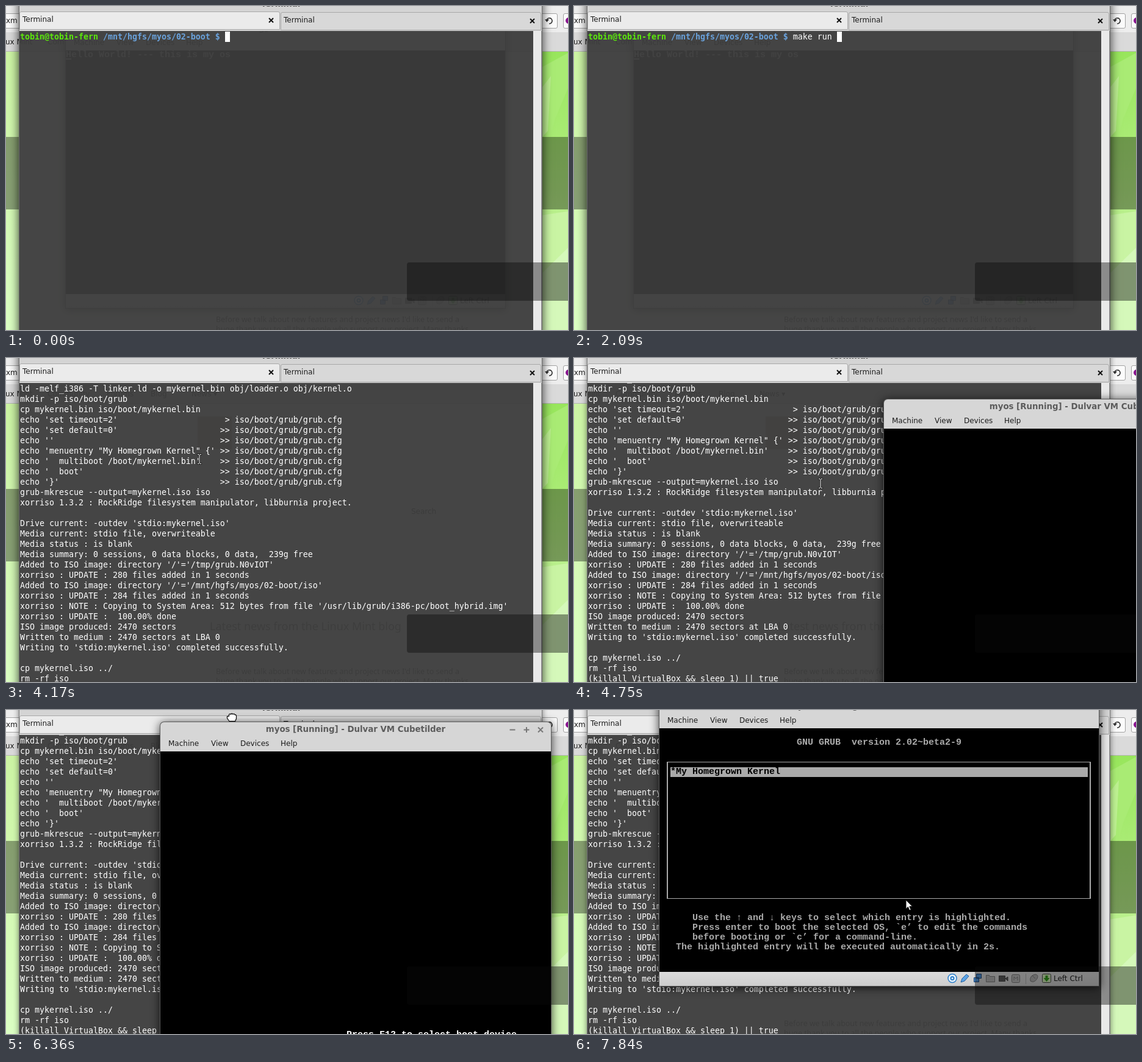
An HTML page for the animation above (8 s loop, 921 by 532 pixels).

```html
<!DOCTYPE html>
<html lang="en">
<head>
<meta charset="utf-8">
<title>Kernel boot</title>
<style>
html, body { margin: 0; width: 100%; height: 100%; overflow: hidden; }
#stage { position: relative; width: 921px; height: 532px; overflow: hidden; background: #d3f6b4;
  font: 12px/24px "DejaVu Sans", sans-serif; color: #1c1c1c; white-space: nowrap; }
#stage div, #stage svg { position: absolute; }
#lines, .vga, .news { white-space: pre; }

/* browser behind everything */
#page { inset: 0; }
#scene { left: 0; top: 75px; }
.toolbar { left: 0; right: 0; top: 0; height: 43px; background: #ededed; }
.marks { left: 0; right: 0; top: 43px; height: 31px; background: #dadada; border-bottom: 1px solid #b4b4b4; }
.field { box-sizing: border-box; top: 12px; height: 25px; background: #fbfbfb; border: 1px solid #a2a2a2; border-radius: 3px; }
.band { left: 0; right: 0; top: 215px; height: 119px; background: rgba(0,0,0,.36); }
.sheet { left: 22px; top: 75px; width: 857px; height: 460px; background: #f4f6f0; }
.news { font: 12.4px/16px "Noto Sans", sans-serif; left: 344px; top: 507px; color: #333; }

/* virtual machine window */
.vm { left: 0; top: 0; border-radius: 6px 6px 0 0; background: #d6d6d6; box-shadow: 0 0 0 1px #5a5a5a, 0 2px 15px 1px rgba(0,0,0,.75); }
.vm .name { left: 0; right: 0; top: 0; height: 24px; text-align: center; font: bold 13.33px/24px "DejaVu Sans", sans-serif; color: #5c5c5c; }
.vm .tools { right: 10px; top: 6px; }
.vm .menu { left: 0; top: 23px; }
#stage .screen { position: relative; margin-top: 48px; width: 720px; height: 400px; background: #000; overflow: hidden; }
#stage .status { position: relative; height: 23px; background: linear-gradient(#dcdcdc, #cdcdcd); }
.vga { left: 0; top: 0; font: bold 15px/16px "Liberation Mono", "DejaVu Sans Mono", monospace; color: #aaa; }
#ghost { transform: translate(98px, 25px); animation: ghost 8s step-end infinite; }
#guest { animation: guest 8s step-end infinite, late 8s step-end infinite; }
#guest .screen { animation: mode 8s step-end infinite; }
#splash { left: 305px; top: 458px; color: #fff; animation: splash 8s step-end infinite; }
#grub { inset: 0; animation: grub 8s step-end infinite; }
#grub .frame { left: 12px; top: 55px; width: 691px; height: 223px; border: solid #aaa; border-width: 1px 2px; }
#grub .pick { left: 18px; top: 64px; width: 684px; height: 16px; background: #aaa; }
#grub .pick .vga { color: #000; }
#count { top: 352px; left: 27px; animation: count 8s step-end infinite; }

/* terminal window */
#term { left: 22px; top: -15px; width: 856px; height: 570px; animation: focus 8s step-end infinite; }
#term .bar { left: 0; top: 0; width: 856px; height: 56px; background: #d4d4d4; }
#term .name { left: 0; right: 0; top: 0; text-align: center; font: bold 13.33px/24px "DejaVu Sans", sans-serif; color: #4c4c4c; }
.tab { box-sizing: border-box; height: 30px; border: 1px solid #a8a8a8; border-radius: 3px 3px 0 0; line-height: 25px; padding-left: 4px; }
.tab svg { right: 9px; top: 9px; }
#term .scroll { left: 842px; top: 56px; width: 13px; height: 520px; background: #e9e9e9; border-right: 1px solid #999; }
#text { left: 0; top: 56px; width: 842px; height: 520px; overflow: hidden; background: rgba(61,61,61,.95); }
#lines { left: 1px; top: 1px; font: 13.29px/17px "DejaVu Sans Mono", monospace; color: #fff; animation: scroll 8s step-end infinite; }
.user { color: #5be80c; }
.path { color: #6aa2dc; }
#prompt { left: 0; top: 0; height: 17px; }
#typed { display: inline-block; vertical-align: top; height: 17px; overflow: hidden; animation: typing 8s step-end infinite; }
#caret { display: inline-block; vertical-align: top; width: 8px; height: 17px; background: #fff; animation: caret 8s step-end infinite; }
#out { left: 0; top: 17px; width: 842px; overflow: hidden; animation: output 8s step-end infinite; }

#shade { left: 657px; top: 421px; width: 280px; height: 63px; border-radius: 4px; background: rgba(10,10,10,.42); animation: shade 8s step-end infinite; }
#mouse { left: 0; top: 0; animation: mouse 8s step-end infinite; }
#mouse svg { overflow: visible; left: 0; top: 0; }
#beam { animation: beam 8s step-end infinite; }
#arrow { animation: arrow 8s step-end infinite; }
#hand { animation: hand 8s step-end infinite; }

@keyframes typing {
  0% { width: 0 } 3.75% { width: 8px } 5.625% { width: 16px }
  11.125% { width: 24px } 13% { width: 32px } 14.875% { width: 40px }
  18.625% { width: 48px } 20.5% { width: 56px } 24.25% { width: 64px } 26.125% { width: 72px }
}
@keyframes caret { 0% { visibility: visible } 29.75% { visibility: hidden } }
@keyframes output {
  0% { height: 0 } 29.75% { height: 85px } 31.625% { height: 289px }
  33.5% { height: 459px } 37.25% { height: 476px } 39.125% { height: 612px }
}
@keyframes scroll {
  0% { transform: none } 39.125% { transform: translateY(-34px) } 40.875% { transform: translateY(-68px) }
  42.75% { transform: translateY(-102px) } 54% { transform: translateY(-119px) }
}
@keyframes focus {
  0% { box-shadow: 0 0 0 1px #6a6a6a, 0 2px 15px 1px rgba(0,0,0,.75) }
  55.75% { box-shadow: 0 0 0 1px #7a7a7a, 0 1px 10px rgba(0,0,0,.6) }
}
@keyframes ghost { 0% { visibility: visible } 40.875% { visibility: hidden } }
@keyframes late { 0% { visibility: hidden } 55.75% { visibility: visible } }
@keyframes guest {
  0% { transform: translate(508px, 68px) }
  66.75% { transform: translate(500px, 66px) } 68.625% { transform: translate(478px, 60px) }
  70.375% { transform: translate(440px, 52px) } 72.25% { transform: translate(392px, 44px) }
  74.125% { transform: translate(340px, 36px) } 75.875% { transform: translate(297px, 29px) }
  77.75% { transform: translate(268px, 23px) } 79.5% { transform: translate(253px, 20px) }
  81.25% { transform: translate(222px, 8px) } 83.125% { transform: translate(176px, -8px) }
  84.875% { transform: translate(140px, -18px) }
}
@keyframes mode { 0% { width: 640px; height: 480px } 88.75% { width: 720px; height: 400px } }
@keyframes splash { 0% { opacity: 0 } 77.75% { opacity: 1 } 86.75% { opacity: 0 } }
@keyframes grub { 0% { opacity: 0 } 92.375% { opacity: 1 } }
@keyframes count { 0% { opacity: 0 } 96.125% { opacity: 1 } }
@keyframes shade { 0% { clip-path: none } 31.625% { clip-path: inset(0 0 0 163px) } 39.125% { clip-path: none } }
@keyframes mouse {
  0% { transform: translate(519px, 124px) }
  39.125% { transform: translate(518px, 131px) } 40.875% { transform: translate(516px, 140px) }
  42.75% { transform: translate(515px, 147px) } 46.5% { transform: translate(465px, 157px) }
  48.375% { transform: translate(401px, 166px) } 52.125% { transform: translate(317px, 166px) }
  54% { transform: translate(322px, 172px) } 55.75% { transform: translate(345px, 184px) }
  57.625% { transform: translate(376px, 197px) } 59.375% { transform: translate(404px, 206px) }
  61.25% { transform: translate(478px, 172px) } 63.125% { transform: translate(570px, 112px) }
  65% { transform: translate(625px, 80px) } 66.75% { transform: translate(617px, 76px) }
  68.625% { transform: translate(595px, 68px) } 70.375% { transform: translate(557px, 56px) }
  72.25% { transform: translate(509px, 42px) } 74.125% { transform: translate(457px, 30px) }
  75.875% { transform: translate(414px, 21px) } 77.75% { transform: translate(385px, 15px) }
  79.5% { transform: translate(370px, 12px) } 81.25% { transform: translate(339px, 3px) }
  83.125% { transform: translate(293px, -3px) } 84.875% { transform: translate(257px, -6px) }
  86.75% { transform: translate(268px, 20px) } 88.75% { transform: translate(315px, 78px) }
  90.5% { transform: translate(385px, 148px) } 92.375% { transform: translate(455px, 208px) }
  94.25% { transform: translate(500px, 246px) } 96.125% { transform: translate(530px, 286px) }
  98% { transform: translate(544px, 312px) }
}
@keyframes beam { 0% { opacity: 0 } 37.25% { opacity: 1 } 63.125% { opacity: 0 } }
@keyframes arrow { 0% { opacity: 0 } 63.125% { opacity: 1 } 66.75% { opacity: 0 } 86.75% { opacity: 1 } }
@keyframes hand { 0% { opacity: 0 } 66.75% { opacity: 1 } 84.875% { opacity: 0 } }
</style>
</head>
<body>
<div id="stage">
  <div id="page">
    <svg id="scene" width="921" height="457">
      <defs>
        <linearGradient id="pale" x2="0" y2="1"><stop stop-color="#ccf4a4"/><stop offset="1" stop-color="#dcffc4"/></linearGradient>
        <linearGradient id="leaf" x2="0" y2="1"><stop stop-color="#98e65c"/><stop offset=".5" stop-color="#b4ee83"/><stop offset="1" stop-color="#d6f9bb"/></linearGradient>
      </defs>
      <path fill="url(#pale)" d="M0 0H450V457H0z"/>
      <path fill="url(#leaf)" d="M450 0H921V457H450z"/>
      <path fill="#a9eb74" d="M870 30L921 2V60L900 110L892 140H870z"/>
      <path fill="#bdf091" d="M870 70L893 40L888 130L870 150z"/>
      <path fill="#c9f4a3" d="M870 270L921 262V330L870 380z"/>
      <path fill="#d5f8ba" d="M870 372L921 322V457H870z"/>
    </svg>
    <div class="band"></div>
    <div class="sheet"></div>
    <div class="toolbar">
      <div class="field" style="left:-10px;width:850px"></div>
      <div style="left:0;top:12px">xm</div>
      <div class="field" style="left:860px;width:44px"></div>
      <svg style="left:882px;top:16px" width="17" height="17" fill="none" stroke="#333" stroke-width="1.7"><path d="M4 7A4.6 4.6 0 1 1 8 13"/><path fill="#333" stroke="none" d="M1 6h7l-3.6 4.6z"/></svg>
      <div class="field" style="left:913px;width:60px"></div>
      <div style="left:917px;top:19px;width:10px;height:10px;border-radius:5px;background:#8a1490"></div>
    </div>
    <div class="marks">
      <div style="left:-1px;top:4px">ux Mint</div>
      <div style="left:68px;top:4px">Community</div>
      <div style="left:165px;top:4px">Forums</div>
      <div style="left:237px;top:4px">Blog</div>
      <div style="left:304px;top:4px">News ▾</div>
    </div>
    <div style="left:314px;top:96px;width:56px;height:54px;background:#a9a58c"></div>
    <div style="left:664px;top:240px">Search</div>
    <div style="left:334px;top:428px;font:18px/24px 'Noto Sans',sans-serif;color:#555">Latest news from the Linux Mint blog</div>
    <div class="news">Before we talk about new features and project news I'd like to send a
huge thank you to all the people who support our project. Many thanks</div>
  </div>
  <div id="ghost" class="vm"></div>
  <div id="term">
    <div class="bar">
      <div class="name">Terminal</div>
      <div class="tab" style="left:0;top:24px;width:427px;background:#ebebeb">Terminal</div>
      <div class="tab" style="left:428px;top:25px;width:427px;background:#d8d8d8">Terminal</div>
    </div>
    <div id="text"><div id="lines"><div id="prompt"><b class="user">tobin@tobin-fern</b> <b class="path">/mnt/hgfs/myos/02-boot $</b> <span id="typed">make run </span><span id="caret"></span></div><div id="out"></div></div></div>
    <div class="scroll"></div>
  </div>
  <div id="guest" class="vm"></div>
  <div id="mouse">
    <svg id="beam" width="1" height="1" fill="none"><path stroke="#222" stroke-width="3" d="M-4-7.5H4M-4 7.5H4M0-7V7"/><path stroke="#fff" d="M-3-7.5H-1L0-6.5 1-7.5H3M-3 7.5H-1L0 6.5 1 7.5H3M0-6.5V6.5"/></svg>
    <svg id="arrow" width="1" height="1"><path fill="#fff" stroke="#111" d="M0 0V14.5L3.4 11.3 5.8 17 8.2 16 5.8 10.6H10.4z"/></svg>
    <svg id="hand" width="1" height="1"><path fill="#fff" stroke="#111" stroke-width="1.3" d="M-4 6.5L-7.5 1.5V-1.5L-4.5-2V-4.5Q-3-6.5-1.5-5Q0-7 2-5Q4-6.5 5-4.2Q7.5-4.5 7.5-2V2L5.5 6.5z"/></svg>
  </div>
  <div id="shade"></div>
</div>
<script>
const $ = id => document.getElementById(id);
const at = (x, text) => `<div style="left:${x}px">${text}</div>`;

// Window chrome shared by both virtual machine windows
const chrome = screen => `
<div class="name">myos [Running] - Dulvar VM Cubetilder</div>
<svg class="tools" width="62" height="13" stroke="#777" stroke-width="2"><path d="M4.500 6.500h9M27.500 6.500h9M32 2v9M51 2.500l8 8M59 2.500l-8 8"/></svg>
<div class="menu">${at(13, 'Machine')}${at(83, 'View')}${at(131, 'Devices')}${at(197, 'Help')}</div>
<div class="screen">${screen}</div>
<div class="status">
<svg width="720" height="23" fill="none" stroke="#777">
<circle cx="480" cy="10.500" r="7" fill="#e6f2fc" stroke="#2d7fca" stroke-width="1.500"/><circle cx="480" cy="10.500" r="2.500" stroke="#2d7fca" stroke-width="2"/>
<path fill="#5ca4e6" stroke="#225f9e" d="M494 17l2-6 7-7 4 3-7 8z"/>
<path fill="#4d92d8" stroke="#173f70" d="M519.500 3.500h8v7h-8zM515.500 9.500h8v7h-8z"/>
<path fill="#b4b4b4" d="M535.500 5.500h5l1 2h8v9h-14z"/>
<path fill="#555" stroke="#444" d="M556.500 6.500h10v9h-10zM567 11l4-3v7z"/>
<rect x="577.500" y="4.500" width="13" height="13" rx="2" fill="#bbb"/><path d="M581 14V8l3 3 3-3v6"/>
<path stroke="#aaa" d="M600.500 3v17"/>
<path fill="#b0b0b0" d="M608 15q-2-9 8-11q6 1 3 7q-5 8-11 4zM611 6l5 5"/>
<rect x="627.500" y="3.500" width="14" height="14" rx="2" fill="#cde8b4" stroke="#444"/><path fill="#2f9a17" stroke="none" d="M632.500 6h4v4h3l-5 6-5-6h3z"/>
</svg><div style="left:646px;top:-1px">Left Ctrl</div></div>`;

$('ghost').innerHTML = chrome(`<div class="vga">Hello World! --- this is my os</div>
<div style="left:0;top:13px;width:9px;height:2px;background:#aaa"></div>`);

const help = [
  'Use the ↑ and ↓ keys to select which entry is highlighted.',
  'Press enter to boot the selected OS, `e’ to edit the commands',
  'before booting or `c’ for a command-line.'
].join('\n');

$('guest').innerHTML = chrome(`<div id="splash" class="vga">Press F12 to select boot device.</div>
<div id="grub">
<div class="vga" style="left:225px;top:16px">GNU GRUB  version 2.02~beta2-9</div>
<div class="frame"></div>
<div class="pick"><div class="vga">*My Homegrown Kernel</div></div>
<div class="vga" style="left:54px;top:304px">${help}</div>
<div id="count" class="vga">The highlighted entry will be executed automatically in 2s.</div>
</div>`);

for (const tab of document.querySelectorAll('.tab'))
  tab.innerHTML += '<svg width="9" height="9" stroke="#111" stroke-width="2"><path d="M1 1l7 7M8 1l-7 7"/></svg>';

const echo = (text, op = '>>') => `echo '${text}'`.padEnd(41) + op.padStart(2) + ' iso/boot/grub/grub.cfg';

$('out').textContent = [
  'mkdir -p obj',
  'as --32 -o obj/loader.o loader.s',
  'mkdir -p obj',
  'gcc -m32 -Iinclude -nostdlib -fno-builtin -fno-exceptions -fno-leading-underscore -Wno-write-strings -std',
  '=c99 -c -o obj/kernel.o kernel.c',
  'ld -melf_i386 -T linker.ld -o mykernel.bin obj/loader.o obj/kernel.o',
  'mkdir -p iso/boot/grub',
  'cp mykernel.bin iso/boot/mykernel.bin',
  echo('set timeout=2', '>'),
  echo('set default=0'),
  echo(''),
  echo('menuentry "My Homegrown Kernel" {'),
  echo('  multiboot /boot/mykernel.bin'),
  echo('  boot'),
  echo('}'),
  'grub-mkrescue --output=mykernel.iso iso',
  'xorriso 1.3.2 : RockRidge filesystem manipulator, libburnia project.',
  '',
  "Drive current: -outdev 'stdio:mykernel.iso'",
  'Media current: stdio file, overwriteable',
  'Media status : is blank',
  'Media summary: 0 sessions, 0 data blocks, 0 data,  239g free',
  "Added to ISO image: directory '/'='/tmp/grub.N0vIOT'",
  'xorriso : UPDATE : 280 files added in 1 seconds',
  "Added to ISO image: directory '/'='/mnt/hgfs/myos/02-boot/iso'",
  'xorriso : UPDATE : 284 files added in 1 seconds',
  "xorriso : NOTE : Copying to System Area: 512 bytes from file '/usr/lib/grub/i386-pc/boot_hybrid.img'",
  'xorriso : UPDATE :  100.00% done',
  'ISO image produced: 2470 sectors',
  'Written to medium : 2470 sectors at LBA 0',
  "Writing to 'stdio:mykernel.iso' completed successfully.",
  '',
  'cp mykernel.iso ../',
  'rm -rf iso',
  '(killall VirtualBox && sleep 1) || true'
].join('\n');
</script>
</body>
</html>
```
